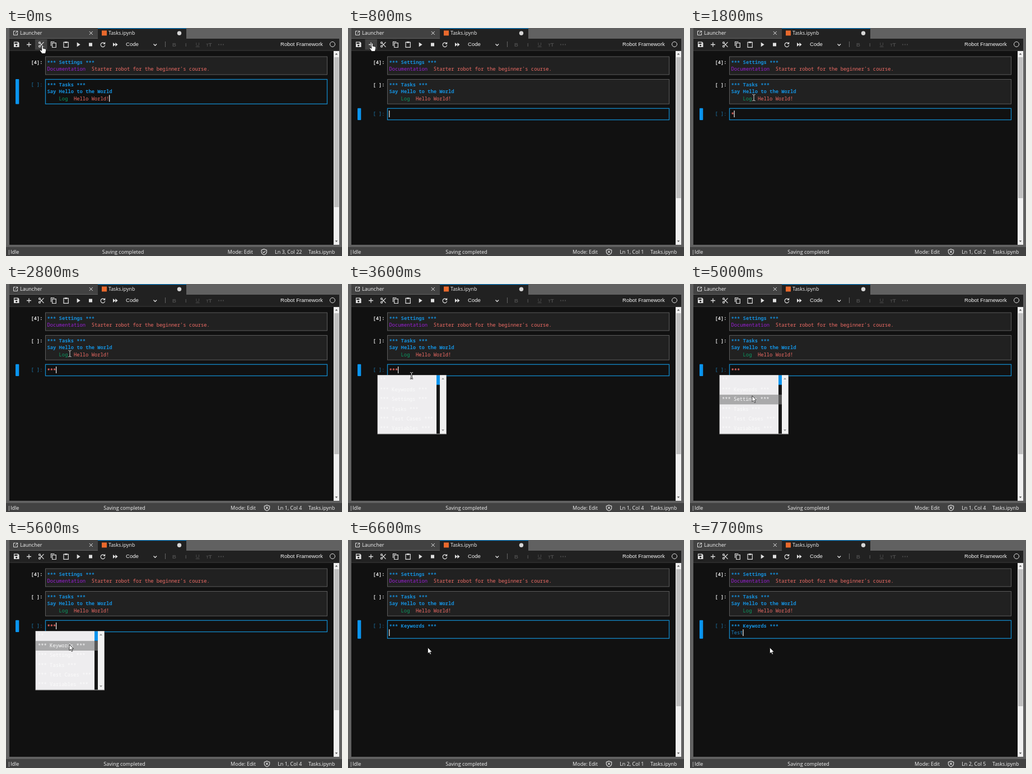
An HTML page for the animation above (8 s loop, 600 px wide and 406 px high).

```html
<!DOCTYPE html>
<html lang="en">
<head>
<meta charset="utf-8">
<title>Notebook editing</title>
<style>
html, body { margin: 0; width: 100%; height: 100%; overflow: hidden; background: #616161; }
svg { display: block; width: 600px; height: 406px; }
text { white-space: pre; }
.ui { font: 9.05px "Open Sans", "Noto Sans", sans-serif; fill: #f4f4f4; }
.tool { font: 9.55px "Liberation Sans", Arial, sans-serif; fill: #f4f4f4; }
.code { font: 8.8px "Noto Sans Mono", "DejaVu Sans Mono", monospace; }
.b { font-weight: 700; }
.head { fill: #1590dd; font-weight: 700; }
.name { fill: #1c82c6; }
.meta { fill: #9a1fd6; }
.str { fill: #f26d66; }
.kw { fill: #0a9b62; }
.icon { fill: none; stroke: #e0e0e0; stroke-width: 1.3; }
.solid { fill: #e0e0e0; }
.dim { opacity: .2; }
</style>
</head>
<body>
<svg viewBox="0 0 600 406">
  <rect width="600" height="406" fill="#616161"/>
  <rect x="6" width="158" height="18" fill="#424242"/>
  <rect x="164" width="158" height="20" fill="#212121"/>
  <rect x="164" width="158" height="1.2" fill="#1689cf"/>
  <rect x="6" y="19" width="589" height="367" fill="#111"/>
  <rect x="6" y="19" width="589" height="21" fill="#212121"/>
  <rect x="6" y="39.6" width="589" height="1" fill="#3a3a3a"/>
  <rect y="390" width="600" height="16" fill="#424242"/>

  <!-- tabs -->
  <g class="icon" stroke-width="1">
    <path d="M17 5.5h-3.5v7h7V9M18 5.5h2.7v2.7M20.5 5.7l-4 4" style="stroke-width:1"/>
    <path d="M148.800 6l6 6m0-6l-6 6" style="stroke-width:1"/>
  </g>
  <text class="ui" x="25" y="12.300">Launcher</text>
  <rect x="171" y="4.500" width="9" height="9" fill="#e8692c"/>
  <text class="ui" x="183" y="12.300" style="font-size:8.85px">Tasks.ipynb</text>
  <circle cx="309.500" cy="9.300" r="3.700" fill="#d6d6d6"/>

  <!-- toolbar -->
  <rect id="hover" y="20" width="21.500" height="18.500" fill="#424242"/>
  <path class="solid" fill-rule="evenodd" d="M14 24.500h7.500l2 2v7.500h-9.500zM15.200 25.700v2.600h5.300v-2.600zM18.700 29.700a1.600 1.600 0 1 0 .01 0z"/>
  <path class="icon" d="M37 29.500h8M41 25.500v8"/>
  <g class="icon" style="stroke-width:1.2">
    <circle cx="60" cy="26.300" r="1.500"/><circle cx="60" cy="32.700" r="1.500"/>
    <path d="M61.200 27.400l6.300 6.400M61.200 31.600l6.300-6.400"/>
    <path d="M80.500 32v-7.500h6M82.700 26.700h6.600v7.800h-6.600z"/>
    <path d="M103 25.300h8.300v9H103z"/><path d="M105 25.500h4.300" style="stroke-width:2.500"/>
    <path d="M175.700 27.200a3.800 3.800 0 1 0 1 3.300"/>
  </g>
  <path class="solid" d="M126.700 25.500l6 4-6 4zM148 26.500h6v6h-6zM177.200 24.800v4h-4zM191 26l4.300 3.500-4.300 3.500zM195.300 26l4.300 3.500-4.300 3.500z"/>
  <text class="tool" x="214" y="32.300">Code</text>
  <path class="icon" d="M263.500 28.500l2.800 2.800 2.800-2.800"/>
  <rect x="284" y="24" width="1" height="10" fill="#666"/>
  <g class="dim">
    <text class="tool b" x="297" y="32.500">B</text>
    <text class="tool b" x="320" y="32.500" font-style="italic">I</text>
    <text class="tool" x="338.700" y="32" text-decoration="underline">U</text>
    <text class="tool b" x="357.500" y="32.500"><tspan font-size="7">T</tspan>T</text>
    <path class="solid" d="M379 28.500h2v2h-2zM383 28.500h2v2h-2zM387 28.500h2v2h-2z"/>
  </g>
  <text class="tool" x="490" y="32.300">Robot Framework</text>
  <circle class="icon" cx="583" cy="29" r="4.500" style="stroke-width:1"/>

  <!-- scroll bar -->
  <rect x="585" y="41" width="10" height="345" fill="#f0f0f0"/>
  <rect id="thumb" x="586" y="52" width="8.500" fill="#c0c0c0"/>
  <path d="M587.700 47.500l2.300-2.800 2.300 2.800zM587.700 378.500l2.300 2.800 2.300-2.800z" fill="#555"/>

  <!-- cells -->
  <rect id="bar" x="17" width="6.300" rx="1" fill="#0a94ee"/>
  <rect x="70.500" y="51" width="503" height="32" fill="#212121" stroke="#5c5c5c"/>
  <rect id="box2" x="70.500" y="91.500" width="503" height="43.700"/>
  <rect id="box3" x="70.500" y="143.200" width="503" fill="#111" stroke="#1389c9" stroke-width="1.300"/>
  <g class="code">
    <text class="b" x="44.500" y="64.300" fill="#e4e4e4">[4]:</text>
    <text id="prompt2" x="44.500" y="104.200">[ ]:</text>
    <text id="prompt3" x="44.500" y="156.200" fill="#1d79ad">[ ]:</text>
    <text class="head" x="73.500" y="64.300"><tspan dy="1">***</tspan><tspan dy="-1"> Settings </tspan><tspan dy="1">***</tspan></text>
    <text x="73.500" y="76.300"><tspan class="meta">Documentation</tspan><tspan class="str">  Starter robot for the beginner's course.</tspan></text>
    <text class="head" x="73.500" y="104.200"><tspan dy="1">***</tspan><tspan dy="-1"> Tasks </tspan><tspan dy="1">***</tspan></text>
    <text class="head" x="73.500" y="116.300">Say Hello to the World</text>
    <text x="94.600" y="128.500"><tspan class="kw">Log</tspan><tspan class="str">  Hello World!</tspan></text>
    <text id="stars" class="str b" x="73.500" y="157.200"></text>
    <text id="title" class="head" x="73.500" y="156.200"><tspan dy="1">***</tspan><tspan dy="-1"> Keywords </tspan><tspan dy="1">***</tspan></text>
    <text id="typed" class="name" x="73.500" y="168.300"></text>
  </g>
  <rect id="caret" width="1.200" height="12" fill="#f4f4f4"/>

  <!-- completion list -->
  <g id="popup">
    <rect x="52.500" y="162" width="123.500" height="105.500" fill="#a8a8a8"/>
    <rect x="53" y="162.500" width="105" height="104" fill="#eeedef"/>
    <rect x="158" y="162.500" width="6" height="104" fill="#161616"/>
    <rect x="158" y="162.500" width="6" height="17" fill="#0a94ee"/>
    <rect x="164" y="162.500" width="11" height="104" fill="#f1f1f1"/>
    <path d="M167 170l2.500-3 2.500 3zM167 259l2.500 3 2.500-3z" fill="#999"/>
    <rect id="row" x="53" width="111" height="17.300" fill="#808080" opacity=".62"/>
    <g id="items" class="code" fill="#fbfbfb"></g>
  </g>

  <!-- status -->
  <text class="ui" x="-2" y="402">:</text>
  <text class="ui" x="2.700" y="402">|</text>
  <text class="ui" x="8" y="402">Idle</text>
  <text id="saved" class="ui" y="402">Saving completed</text>
  <g id="mode">
    <text class="ui" x="401" y="402">Mode: Edit</text>
    <g class="icon" style="stroke-width:1.100">
      <path d="M466 393.700l4.700 1.800v3c0 2.500-2 4.400-4.700 5.300-2.700-.9-4.700-2.800-4.700-5.300v-3z"/>
      <path id="mark"/>
    </g>
  </g>
  <text id="pos" class="ui" x="528.500" y="402" text-anchor="end"></text>
  <text class="ui" x="540" y="402" style="font-size:8.850px">Tasks.ipynb</text>

  <!-- pointers -->
  <g id="pointer" stroke-linejoin="round">
    <path id="hand" fill="#fff" stroke="#111" stroke-width=".9" d="M-1.300 0.500q1.300-1.500 2.600 0v4.700l4 .9q1.600.5 1.400 2.200l-.8 4.300-.9 2h-5.700l-3.800-5.200q-.5-1.500 1-1.500l2.200 1.500z"/>
    <g id="beam" fill="none">
      <path d="M-2.600-5.500q2 0 2.600 1 .6-1 2.600-1M0-4.500v9M-2.600 5.500q2 0 2.600-1 .6 1 2.600 1" stroke="#111" stroke-width="2.400"/>
      <path d="M-2.600-5.500q2 0 2.600 1 .6-1 2.600-1M0-4.500v9M-2.600 5.500q2 0 2.600-1 .6 1 2.600 1" stroke="#e8e8e8" stroke-width="1"/>
    </g>
    <path id="arrow" fill="#fff" stroke="#111" stroke-width=".8" d="M0 0v10.800l2.500-2.300 1.700 3.900 1.800-.8-1.700-3.700h3.400z"/>
  </g>
</svg>
<script>
const LOOP = 8000, STEP = 100;
const CHAR = 5.28, LEFT = 73.5;
const POP_TOP = 162.3, ROW = 17.4;
const ADD = 700, OPEN = 3000, PICK = 5700, ENTER = 6300;
const STARS = [1800, 2100, 2400];
const KEYS = [6900, 7100, 7300, 7500];
const WORD = "Test";
// time, x, y
const PATH = [
  [100, 65, 31], [500, 43, 27], [900, 43, 27], [1200, 114, 112], [1400, 114, 124],
  [3200, 114, 124], [3600, 113.5, 163], [4200, 113, 196], [4700, 112, 205],
  [5000, 111, 199], [5400, 113, 186], [5700, 113, 186], [6200, 142.5, 191.5]
];
const ITEMS = ["**", "*** Keywords ***", "*** Settings ***", "*** Tasks ***",
  "*** Test Cases ***", "*** Variables ***"];
const EDITS = [0, ADD, ...STARS, PICK, ENTER, ...KEYS];

const el = id => document.getElementById(id);
const set = (id, attrs) => {
  for (const k in attrs) el(id).setAttribute(k, attrs[k]);
};
const show = (id, on) => set(id, { visibility: on ? "inherit" : "hidden" });
const count = (times, t) => times.filter(k => k <= t).length;

ITEMS.forEach((label, i) => {
  const item = document.createElementNS("http://www.w3.org/2000/svg", "text");
  item.setAttribute("x", 57);
  item.setAttribute("y", POP_TOP + i * ROW + 11);
  item.textContent = label;
  el("items").append(item);
});

function pointerAt(t) {
  const i = PATH.findIndex(p => p[0] > t);
  if (i < 0) return PATH[PATH.length - 1].slice(1);
  if (i === 0) return PATH[0].slice(1);
  const [t0, x0, y0] = PATH[i - 1], [t1, x1, y1] = PATH[i];
  const u = (t - t0) / (t1 - t0), e = u * u * (3 - 2 * u);
  return [x0 + (x1 - x0) * e, y0 + (y1 - y0) * e];
}

function drawEditor(t) {
  const added = t >= ADD, picked = t >= PICK, entered = t >= ENTER;
  const stars = count(STARS, t), keys = count(KEYS, t);
  const height = entered ? 32 : 20.3;

  set("bar", added ? { y: 142.7, height: height + 1 } : { y: 91, height: 44.5 });
  set("box2", added
    ? { fill: "#212121", stroke: "#5c5c5c", "stroke-width": 1 }
    : { fill: "#111", stroke: "#1389c9", "stroke-width": 1.3 });
  set("prompt2", added
    ? { fill: "#e0e0e0", "font-weight": 700 }
    : { fill: "#1d79ad", "font-weight": 400 });
  set("box3", { height });
  show("box3", added);
  show("prompt3", added);
  show("stars", !picked);
  show("title", picked);
  el("stars").textContent = "*".repeat(stars);
  el("typed").textContent = WORD.slice(0, keys);
  set("thumb", { height: entered ? 244 : added ? 251 : 267 });

  const line = !added ? 3 : entered ? 2 : 1;
  const col = !added ? 21 : entered ? keys : picked ? 16 : stars;
  const lastEdit = EDITS.filter(e => e <= t).pop();
  set("caret", { x: LEFT + col * CHAR - 0.3, y: !added ? 119.3 : entered ? 159 : 147 });
  show("caret", Math.floor((t - lastEdit) / 500) % 2 === 0);

  const shift = col > 8 ? 5.2 : 0;
  el("pos").textContent = `Ln ${line}, Col ${col + 1}`;
  set("mode", { transform: `translate(${-shift})` });
  set("saved", { x: 174.3 - shift / 2 });
  set("mark", { d: added ? "M464.200 396.700l3.600 3.600m0-3.600l-3.600 3.600" : "M463.700 398.400l1.800 1.800 3-3.300" });
}

function drawPointer(t) {
  const [x, y] = pointerAt(t);
  const kind = t <= 1000 ? "hand" : t <= 3600 ? "beam" : "arrow";
  for (const id of ["hand", "beam", "arrow"]) show(id, id === kind);
  set("pointer", { transform: `translate(${x} ${y})` });
  set("hover", { x: x > 52 ? 52 : 30.5 });
  show("hover", y < 38);

  const open = t >= OPEN && t < PICK;
  show("popup", open);
  set("row", { y: POP_TOP + Math.floor((y - POP_TOP) / ROW) * ROW });
  show("row", open && kind === "arrow");
}

const start = performance.now();
function frame(now) {
  const t = Math.floor(Math.max(0, now - start) % LOOP / STEP) * STEP;
  drawEditor(t);
  drawPointer(t);
  requestAnimationFrame(frame);
}
frame(start);
</script>
</body>
</html>
```
